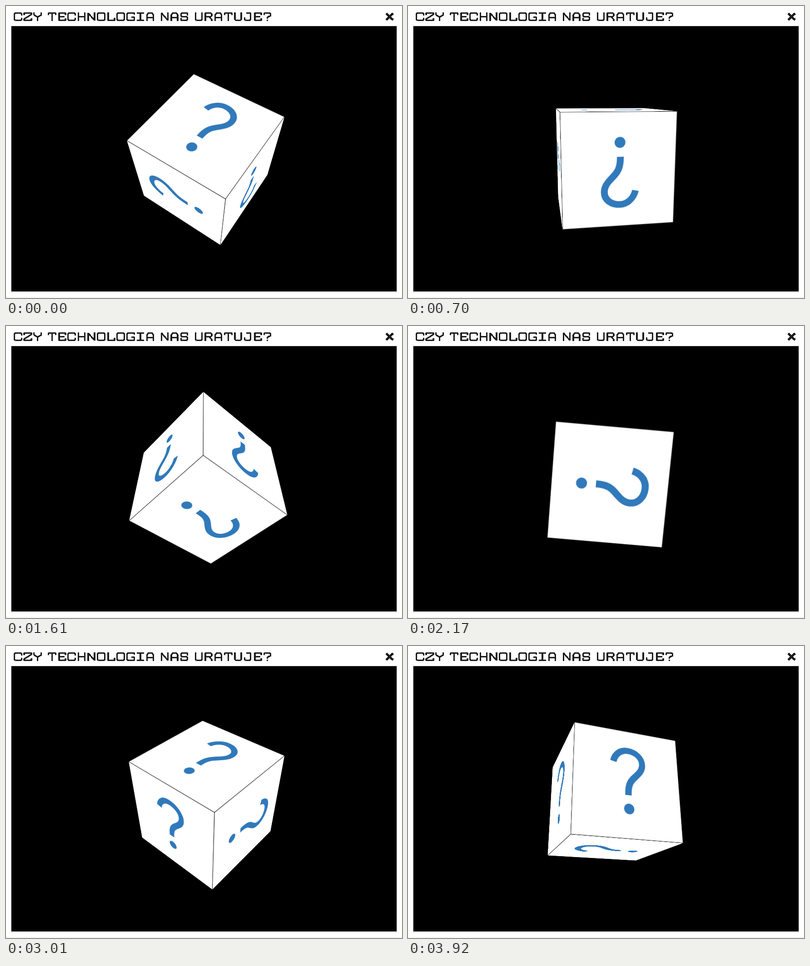
Recreate the animation shown at these times as an HTML page without scripts. Size 872 by 642 pixels, loop 3990 ms.

```html
<!DOCTYPE html>
<html lang="pl">
<head>
<meta charset="utf-8">
<title>Czy technologia nas uratuje?</title>
<style>
  html, body { margin: 0; width: 100%; height: 100%; overflow: hidden; background: #fff; }
  .stage {
    position: relative; width: 872px; height: 642px; overflow: hidden;
    perspective: 750px; perspective-origin: 436px 336px;
  }
  .window { position: absolute; left: 0; top: 0; }
  .lettering { fill: none; stroke: #1d1a1c; stroke-width: 3.3; stroke-linejoin: bevel; stroke-linecap: square; }
  h1 {
    position: absolute; left: 17px; top: 12px; margin: 0; color: transparent;
    font: 26px/24px "DejaVu Sans Mono", monospace; letter-spacing: 4px; white-space: nowrap;
  }
  .cube {
    position: absolute; left: 443px; top: 338.6px; width: 0; height: 0;
    transform-style: preserve-3d; animation: tumble 3990ms infinite;
  }
  .face {
    position: absolute; left: -110px; top: -110px; width: 220px; height: 220px;
    transform: var(--turn) translateZ(110px); backface-visibility: hidden;
  }
  .face svg { display: block; }
  .front  { --turn: rotateZ(180deg); }
  .right  { --turn: rotateY(90deg) rotateZ(180deg); }
  .bottom { --turn: rotateX(-90deg) rotateZ(180deg); }
  .left   { --turn: rotateY(-90deg) rotateZ(-90deg); }
  .top    { --turn: rotateX(90deg) rotateZ(90deg); }

  /* One step per 70 ms, then a hard cut back to the start. */
  @keyframes tumble {
    0%     { transform: rotateX(-55.9deg) rotateY(55.9deg);   animation-timing-function: steps(10); }
    17.54% { transform: rotateX(-10deg) rotateY(10deg);       animation-timing-function: steps(7); }
    29.82% { transform: rotateX(20.6deg) rotateY(-20.6deg);   animation-timing-function: steps(6); }
    40.35% { transform: rotateX(48.1deg) rotateY(-48.1deg);   animation-timing-function: steps(8); }
    54.38% { transform: rotateX(85deg) rotateY(-85deg);       animation-timing-function: steps(12); }
    75.43% { transform: rotateX(138.8deg) rotateY(-138.8deg); animation-timing-function: steps(13); }
    98.24%, 100% { transform: rotateX(199.3deg) rotateY(-199.3deg); }
  }
</style>
</head>
<body>
<div class="stage">
  <svg class="window" width="872" height="642" viewBox="0 0 872 642" aria-hidden="true">
    <defs>
      <path id="A" d="M1 16V4L4 0H12L15 4V16M1 10H15"/>
      <path id="C" d="M16 4V2L14 0H2L0 2V14L2 16H14L16 14V12"/>
      <path id="E" d="M16 3V0H2V16H16V13M2 8H12"/>
      <path id="G" d="M16 2V0H2L0 2V14L2 16H16V9H11"/>
      <path id="H" d="M1 0V16M15 0V16M1 8H15"/>
      <path id="I" d="M2 0H14M8 0V16M2 16H14"/>
      <path id="J" d="M6 0H14V14L12 16H3L1 14V11"/>
      <path id="L" d="M2 0V16H16V12"/>
      <path id="N" d="M1 16V0L15 16V0"/>
      <path id="O" d="M2 0H14L16 2V14L14 16H2L0 14V2Z"/>
      <path id="R" d="M1 16V0H13L15 2V6L13 8H1M9 8L15 14V16"/>
      <path id="S" d="M15 4V0H3L1 2V6L3 8H13L15 10V14L13 16H1V12"/>
      <path id="T" d="M0 3V0H16V3M8 0V16"/>
      <path id="U" d="M1 0V14L3 16H13L15 14V0"/>
      <path id="Y" d="M0 0V4L8 9L16 4V0M8 9V16"/>
      <path id="Z" d="M0 3V0H16V3L0 13V16H16V13"/>
      <path id="ask" d="M1 3V0H13L15 2V6L8 9V11M8 16V16.1"/>
      <g id="die">
        <rect width="220" height="220" fill="#fff" stroke="#222" stroke-width="1.2"/>
        <g transform="translate(110 110)">
          <path d="M-31-40.4C-27.5-56-16-66.8-1-66.8C17-66.8 29.8-56 29.8-41C29.8-29 22-21 14-13C4-3-1 4-1 26"
            fill="none" stroke="#3079ba" stroke-width="13.2"/>
          <circle cy="53.2" r="10.4" fill="#3079ba"/>
        </g>
      </g>
    </defs>
    <rect x="11.7" y="44.2" width="848.6" height="583.5"/>
    <rect y="641" width="872" height="1" fill="#e6e6e6"/>
    <g class="lettering" shape-rendering="crispEdges">
      <g transform="translate(18.5 15.5)">
        <use href="#C"/><use href="#Z" x="21.6"/><use href="#Y" x="43.2"/>
      </g>
      <g transform="translate(93.5 15.5)">
        <use href="#T"/><use href="#E" x="21.6"/><use href="#C" x="43.2"/><use href="#H" x="64.8"/>
        <use href="#N" x="86.4"/><use href="#O" x="108"/><use href="#L" x="129.6"/><use href="#O" x="151.2"/>
        <use href="#G" x="172.8"/><use href="#I" x="194.4"/><use href="#A" x="216"/>
      </g>
      <g transform="translate(341.5 15.5)">
        <use href="#N"/><use href="#A" x="21.6"/><use href="#S" x="43.2"/>
      </g>
      <g transform="translate(416.5 15.5)">
        <use href="#U"/><use href="#R" x="21.6"/><use href="#A" x="43.2"/><use href="#T" x="64.8"/>
        <use href="#U" x="86.4"/><use href="#J" x="108"/><use href="#E" x="129.6"/><use href="#ask" x="151.2"/>
      </g>
      <path d="M839 18L850.5 29M850.5 18L839 29" stroke-width="5"/>
    </g>
  </svg>
  <h1>CZY TECHNOLOGIA NAS URATUJE?</h1>
  <div class="cube">
    <div class="face front"><svg width="220" height="220"><use href="#die"/></svg></div>
    <div class="face right"><svg width="220" height="220"><use href="#die"/></svg></div>
    <div class="face bottom"><svg width="220" height="220"><use href="#die"/></svg></div>
    <div class="face left"><svg width="220" height="220"><use href="#die"/></svg></div>
    <div class="face top"><svg width="220" height="220"><use href="#die"/></svg></div>
  </div>
</div>
</body>
</html>
```
